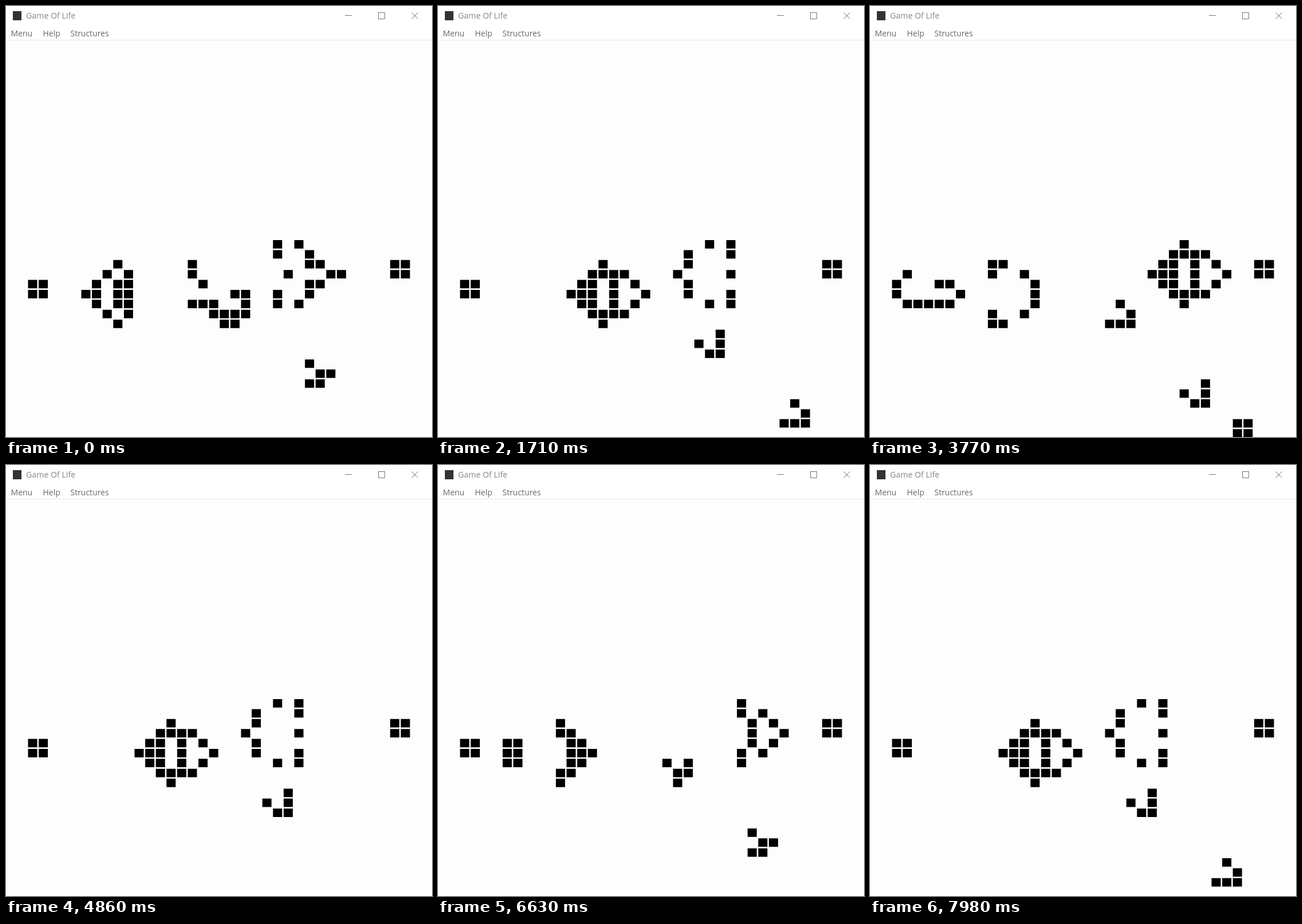
An HTML page that plays this animation: 744x753 px, repeating every 8 s.

```html
<!DOCTYPE html>
<html lang="en">
<head>
<meta charset="utf-8">
<title>Game Of Life</title>
<style>
  html, body { margin: 0; width: 100%; height: 100%; overflow: hidden; background: #fff; }
  svg { display: block; }
  text { font: 14px "Open Sans", "Noto Sans", sans-serif; fill: #686868; }
  .title { font-size: 14.2px; fill: #858585; }
  .buttons { fill: none; stroke: #777; }
</style>
</head>
<body>
<svg width="744" height="753" viewBox="0 0 744 753">
  <rect width="744" height="753" fill="#fff"/>
  <rect y="60" width="744" height="693" fill="#fdfdfd"/>
  <rect y="59" width="744" height="1" fill="#ebebeb"/>
  <rect x="12" y="9" width="15" height="16" fill="#333"/>
  <text class="title" x="35" y="22">Game Of Life</text>
  <text x="8.5" y="53">Menu</text>
  <text x="64.5" y="53">Help</text>
  <text x="112.5" y="53">Structures</text>
  <g class="buttons">
    <path d="M592 16.5H604"/>
    <rect x="650.5" y="11.5" width="11" height="11"/>
    <path d="M708.5 11.5L719.5 22.5M719.5 11.5L708.5 22.5"/>
  </g>
  <path id="cells"/>
</svg>
<script>
const SIZE = 40, LOOP = 8000;

// Glider gun, starting at row 20
const START_ROW = 20;
const PATTERN = [
  ".........................O.O",
  ".........................O..O",
  "..........O......O..........OO......OO",
  ".........O.O.....O........O...OO....OO",
  "..OO....O.OO......O.........OO",
  "..OO...OO.OO.........OO..O..O",
  "........O.OO.....OOO..O..O.O",
  ".........O.O.......OOOO",
  "..........O.........OO",
  "", "", "",
  "............................O",
  ".............................OO",
  "............................OO"
];

// Runs of evenly spaced generations: first time, last time, count
const RUNS = [
  [30, 830, 9], [950, 1040, 2], [1190, 1710, 6], [1800, 1920, 2],
  [2010, 2760, 8], [2850, 2850, 1], [2980, 3600, 7], [3710, 3770, 2],
  [3890, 3980, 2], [4130, 4300, 3], [4440, 4860, 5], [4950, 5160, 3],
  [5280, 6010, 8], [6120, 6630, 6], [6750, 6850, 2], [6960, 7680, 8],
  [7770, 7980, 3]
];

const makeGrid = rule => Array.from({ length: SIZE }, (_, row) =>
  Array.from({ length: SIZE }, (_, col) => rule(row, col)));

function neighbours(grid, row, col) {
  let count = 0;
  for (let dy = -1; dy <= 1; dy++)
    for (let dx = -1; dx <= 1; dx++)
      if ((dx || dy) && grid[row + dy]?.[col + dx]) count++;
  return count;
}

const evolve = grid => makeGrid((row, col) => {
  const n = neighbours(grid, row, col);
  return n === 3 || (n === 2 && grid[row][col]);
});

function outline(grid) {
  let d = "";
  grid.forEach((line, row) => line.forEach((alive, col) => {
    if (!alive) return;
    const x = (1.3 + col * 18.6).toFixed(2), y = (61.6 + row * 17.375).toFixed(2);
    d += `M${x} ${y}h16v14.7h-16z`;
  }));
  return d;
}

const times = [0];
for (const [first, last, count] of RUNS)
  for (let i = 0; i < count; i++)
    times.push(Math.round((first + (last - first) * i / Math.max(1, count - 1)) / 10) * 10);

let grid = makeGrid((row, col) => PATTERN[row - START_ROW]?.[col] === "O");
const shapes = times.map(() => {
  const d = outline(grid);
  grid = evolve(grid);
  return d;
});

const cells = document.getElementById("cells");
const origin = performance.now();
let shown = -1;

function draw() {
  const t = (performance.now() - origin) % LOOP;
  const generation = times.findLastIndex(time => time <= t);
  if (generation !== shown) cells.setAttribute("d", shapes[shown = generation]);
  requestAnimationFrame(draw);
}
draw();
</script>
</body>
</html>
```
